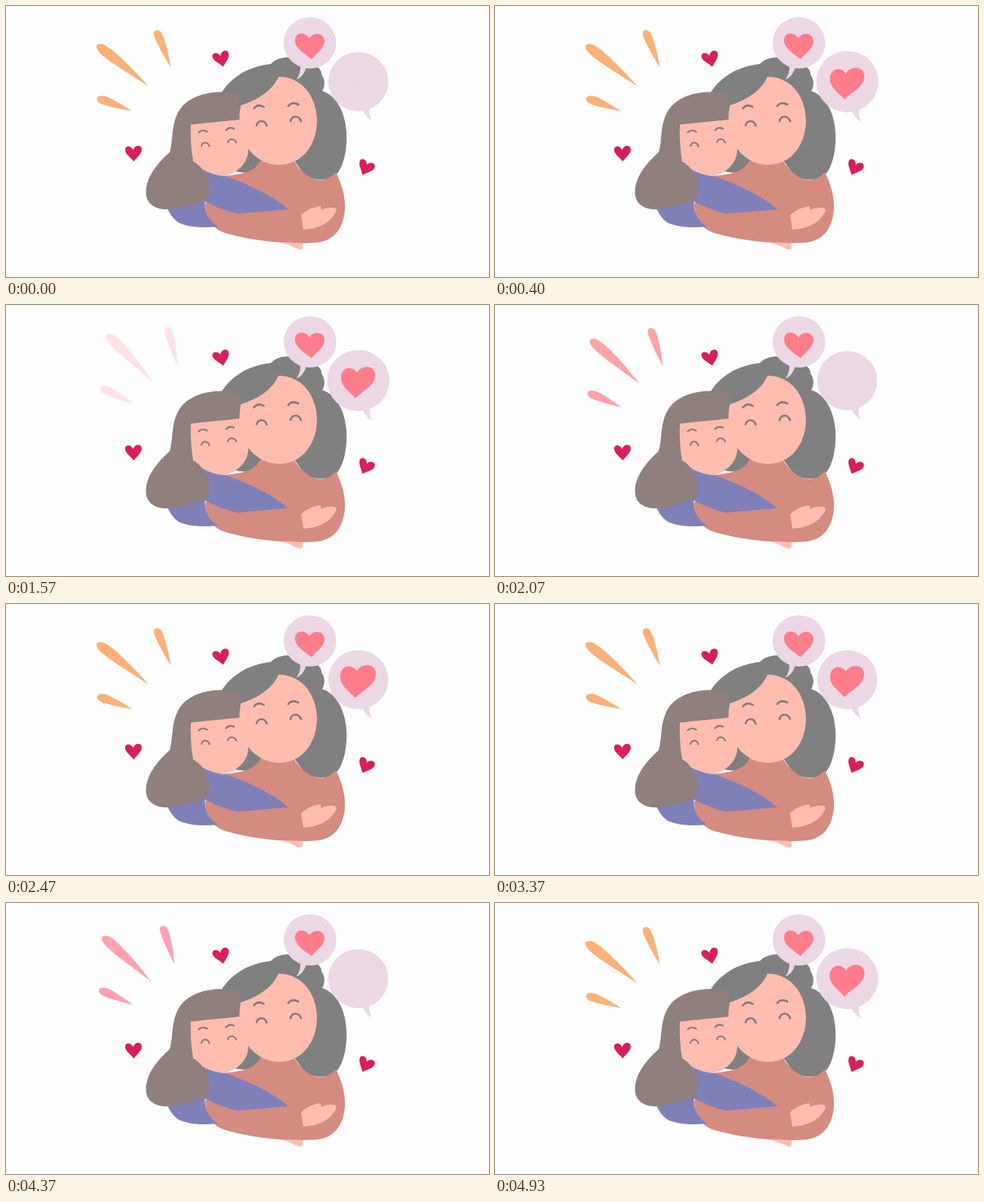
These frames come from a looping animation (640x360 px, 5 s). An HTML page:

```html
<!DOCTYPE html>
<html lang="en">
<head>
<meta charset="utf-8">
<title>Hug</title>
<style>
  html, body { margin: 0; width: 100%; height: 100%; overflow: hidden; background: #fefefe; }
  svg { display: block; width: 640px; height: 360px; }
  .skin { fill: #ffbdb0; }
  .grey { fill: #808080; }
  .brown { fill: #8f7f7d; }
  .blue { fill: #8080b8; }
  .knit { fill: #d48b80; }
  .bubble { fill: #ecd7e5; }
  .heart { fill: #ff7c8b; }
  .small { fill: #da1e5b; }
  .lines { fill: none; stroke: #84787a; stroke-width: 2.6; stroke-linecap: round; }
  .lines .thin { stroke-width: 2.1; }
</style>
</head>
<body>
<svg viewBox="0 0 640 360">
  <defs>
    <path id="mini" d="M0 10.5C-5 4-11 0-11-5.5C-11-11-3-11.500-.3-4.500C1.500-11 10.500-12 11-5.500C11.300 0 5 4.500 0 10.500Z"/>
  </defs>

  <g id="rays">
    <path d="M120 53C121 50 126 50 131 52C144 59 168 83 189 107C165 91 141 77 127 65C122 60 119 56 120 53Z"/>
    <path d="M196 35C197 31 203 31 206 36C211 45 215 63 218.500 82C209 67 201 51 197 42C196 39 195.500 37 196 35Z"/>
    <path d="M121 122C123 118 130 119 137 122C147 127 157 133 167 139.500C152 137 136 134 126 130C121 127 120 125 121 122Z"/>
  </g>

  <g class="small">
    <use href="#mini" transform="translate(285.500 70.500) rotate(-13)"/>
    <use href="#mini" transform="translate(169 196) rotate(-2)"/>
    <use href="#mini" transform="translate(476.500 215) rotate(24) scale(.97)"/>
  </g>

  <g id="mother">
    <path class="grey" d="M285 116C298 95 321 80 351 77C356 71 367 67 377 68.500C390 70 395 74 399 79C409 76 419 84 418 91C423 97 423 107 419 113C437 118 449 140 451 166C453 192 446 219 435 226C425 233 405 233 394 222L378 200L340 205C335 218 320 225 302 219L300 150Z"/>
    <path class="knit" d="M337 205Q360 214 381 205C391 221 404 231 416 231.500Q428 231 437 221C445 236 450 254 449 271C447 295 435 311 414 314C378 317 331 313 292 302C273 296 264 283 264 263L288 226C313 224 332 219 337 205Z"/>
    <path class="skin" d="M361 94C391 93 412 120 412 152C412 186 391 211 362 211C332 211 309 184 309 153Q309 143 311 132C333 125 353 113 361 94Z"/>
    <path class="skin" d="M364 314L393 315V321Q392 325 387 323Q375 317 364 314Z"/>
  </g>

  <g id="girl">
    <path class="blue" d="M213 266L264 257C262 272 267 284 281 293C260 295 242 294 229 288Q218 281 213 266Z"/>
    <path class="blue" d="M260 217C292 224 349 247 374 270L306 276Q283 270 262 259Z"/>
    <path class="skin" d="M244 156L310 149Q313 167 321 186C323 207 308 222 288 226Q272 224 260 217L245 202Z"/>
    <path class="brown" d="M311 118Q308 128 309.500 151L245 157.500Q244 185 248 206C259 213 268 224 269 240C270 251 267 257 261 260C245 264 235 268 219 270C200 272 186 264 185.500 249C185 226 202 208 217 194C222 178 218 157 230 138C244 116 282 109 311 118Z"/>
    <path class="skin" d="M391 278Q401 268 416 266Q418 267 417 271Q427 267 435 268Q440 270 436 276C428 289 414 296 394 297Z"/>
  </g>

  <g class="lines">
    <path d="M328.500 136Q334 129.500 341.500 134M374 133Q379 126.500 387.500 131M332 158.500C334 151 343 151 345.500 159M377 153C379 145 388 145 391 153"/>
    <path class="thin" d="M255.500 168Q260 163 266.500 167M291.500 165Q296 160 302 163M259 186C260.500 180 267.500 180 269.500 186.500M294 181C295.500 175.500 303 175.500 305 181.500"/>
  </g>

  <g class="bubble">
    <path d="M390 79Q391 90 384.500 97.500Q394 95 398 81Z"/>
    <ellipse cx="402.700" cy="49" rx="34.900" ry="34"/>
  </g>
  <path class="heart" d="M405 70.500C396 64 383 56 383 46C383 34 397 34 402 43C407 34 421 35 422 46C422 57 411 62 405 70.500Z"/>

  <g id="bubble" class="bubble">
    <path d="M472 137Q476 148 485 152Q480 144 482 133Z"/>
    <ellipse cx="466.800" cy="100.500" rx="39.800" ry="39.300"/>
  </g>
  <path id="heart" class="heart" d="M463 124C457 116 444 109 444 97C444 82 459 80 465 90C469 81 487 78 489 92C490 108 471 114 463 124Z"/>
</svg>

<script>
  const LOOP = 5000, CYCLE = 2333;
  const ORANGE = [251, 176, 120], PINK = [255, 160, 181], WHITE = [254, 254, 254];

  // Each track lists [ms, value] within one cycle.
  const tracks = {
    fade: [[0, 0], [1167, 0], [1700, 1], [1767, 1], [2300, 0], [2333, 0]],
    heart: [[0, .03], [55, .08], [137, 1.05], [300, 1.02], [500, 1], [1767, 1], [2000, 0], [2300, 0], [2333, .03]],
    bubble: [[0, 1], [137, 1], [300, 1.035], [420, 1.035], [560, 1], [1303, 1], [1467, 1.035], [1587, 1.035], [1727, 1], [2333, 1]]
  };

  const $ = id => document.getElementById(id);
  const rays = $('rays'), bubble = $('bubble'), heart = $('heart');
  const mix = (a, b, k) => a + (b - a) * k;
  const ease = k => k * k * (3 - 2 * k);

  function at(track, t) {
    const i = Math.max(1, track.findIndex(([ms]) => ms >= t));
    const [t0, v0] = track[i - 1], [t1, v1] = track[i];
    return mix(v0, v1, ease((t - t0) / (t1 - t0)));
  }

  function rayColour(k) {
    const [from, to, f] = k < .5 ? [ORANGE, PINK, k * 2] : [PINK, WHITE, k * 2 - 1];
    return `rgb(${from.map((c, i) => Math.round(mix(c, to[i], f)))})`;
  }

  function scaleAbout(el, x, y, s) {
    el.setAttribute('transform', `translate(${x} ${y}) scale(${s}) translate(${-x} ${-y})`);
  }

  function draw(now) {
    const t = (now % LOOP) % CYCLE;
    const fade = at(tracks.fade, t);
    rays.setAttribute('fill', rayColour(fade));
    rays.setAttribute('transform', `rotate(${8.2 * fade} 231 152)`);
    scaleAbout(bubble, 467, 101, at(tracks.bubble, t));
    scaleAbout(heart, 467, 103, at(tracks.heart, t));
  }

  const start = performance.now();
  function tick() {
    draw(performance.now() - start);
    requestAnimationFrame(tick);
  }
  draw(0);
  requestAnimationFrame(tick);
</script>
</body>
</html>
```
